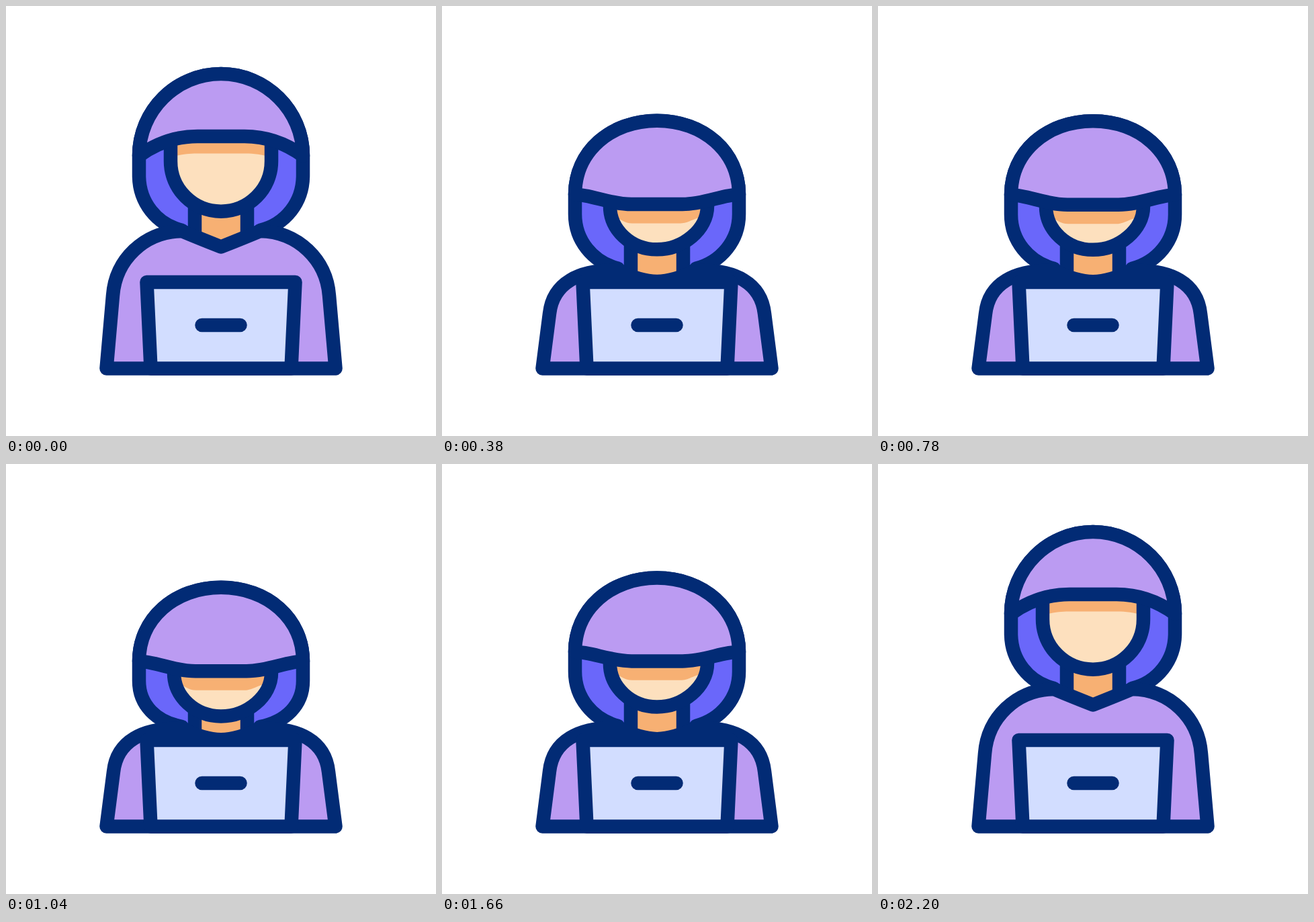
Animation, 640 px wide and 640 px high, one loop 2.42 s. Source, as an HTML page:

```html
<!DOCTYPE html>
<html>
<head>
<meta charset="utf-8">
<style>
html, body { margin: 0; height: 100%; overflow: hidden; background: #fff; }
svg { display: block; width: 100vw; height: 100vh; }
path { fill: none; stroke: #022b75; stroke-width: 20.5; stroke-linecap: round; stroke-linejoin: round; }
.flat { stroke: none; }
.purple { fill: #bb9bf2; }
.indigo { fill: #6a67fa; }
.orange { fill: #f7b073; }
.skin { fill: #fde0be; }
.screen { fill: #d2ddff; }
</style>
</head>
<body>
<svg viewBox="0 0 640 640">
  <path id="hood" class="indigo"/>
  <path id="neck" class="orange"/>
  <g id="head">
    <path id="shade" class="orange flat"/>
    <path id="skin" class="skin flat"/>
    <path id="face"/>
    <path id="cap" class="purple"/>
  </g>
  <path id="body" class="purple"/>
  <path class="screen" d="M215.5 539.5L209.5 411H430.5L424.5 539.5Z"/>
  <path d="M291.5 475H348.5"/>
</svg>
<script>
// Each shape: upright pose, ducked pose, and for the hood a nodding pose with its hem held in place
const face = [
  "M245 194V231C245 272.4 278.6 305.7 320 305.7S395 272.4 395 231V194",
  "M250 292V298C250 333 281 362.6 320 362.6S395 333 395 298V292"
];
const shapes = {
  hood: [
    "M262 334C224 325 198 292 198 252V223C198 155.6 253 101 320 101S442 155.6 442 223V252C442 292 416 325 378 334",
    "M262 391C224 381 198 349 198 310V281C198 217 251 171 320 171S442 217 442 281V310C442 349 416 381 378 391",
    "M262 391C224 384 198 360 198 324V295C198 231 251 185 320 185S442 231 442 295V324C442 360 416 384 378 391"
  ],
  neck: [
    "M281 350V290H359V350",
    "M281 402V348H359V402"
  ],
  shade: face,
  skin: [
    "M245 225C260 221 270 219.5 285 219.5H355C370 219.5 380 221 395 225V231C395 272.4 361.4 305.7 320 305.7S245 272.4 245 231Z",
    "M250 312C266 316 270 324 283 324H355C367 324 372 317 395 312V298C395 333 361 362.6 320 362.6S250 333 250 298Z"
  ],
  face,
  cap: [
    "M198 223C220 207 250 194 285 194H355C390 194 420 207 442 223C442 155.6 387 101 320 101S198 155.6 198 223Z",
    "M198 281C222 281 250 295.5 282 295.5H358C390 295.5 418 281 442 281C442 217 389 171 320 171S198 217 198 281Z"
  ],
  body: [
    "M149.5 539.5L159 431C163 378 205 336 262 335C281 343 301 351 320 358.5C339 351 359 343 378 335C435 336 477 378 481 431L490.5 539.5Z",
    "M149.5 539.5L160 458C165 413 203 392 262 394C281 403 302 410.2 320 410.2C338 410.2 359 403 378 394C437 392 475 413 480 458L490.5 539.5Z"
  ]
};

const number = /[\d.]+/g;
const ease = p => {
  p = Math.min(1, Math.max(0, p));
  return p < 0.5 ? 2 * p * p : 1 - 2 * (1 - p) ** 2;
};

function morph(from, to, k) {
  const ends = to.match(number);
  let i = 0;
  return from.replace(number, a => +a + (ends[i++] - a) * k);
}

function draw(now) {
  const t = now % 2420;
  const duck = ease(t / 400) - ease((t - 1600) / 600);
  const nodding = t > 400 && t < 1600;
  const nod = nodding ? ease(1 - Math.abs(1 - (t % 400) / 200)) : 0;

  for (const [id, [upright, ducked, nodded]] of Object.entries(shapes)) {
    let d = morph(upright, ducked, duck);
    if (nodded) d = morph(d, nodded, nod);
    document.getElementById(id).setAttribute("d", d);
  }
  document.getElementById("head").setAttribute("transform", `translate(0 ${14 * nod})`);
}

const start = performance.now();
function tick() {
  draw(performance.now() - start);
  requestAnimationFrame(tick);
}
tick();
</script>
</body>
</html>
```
